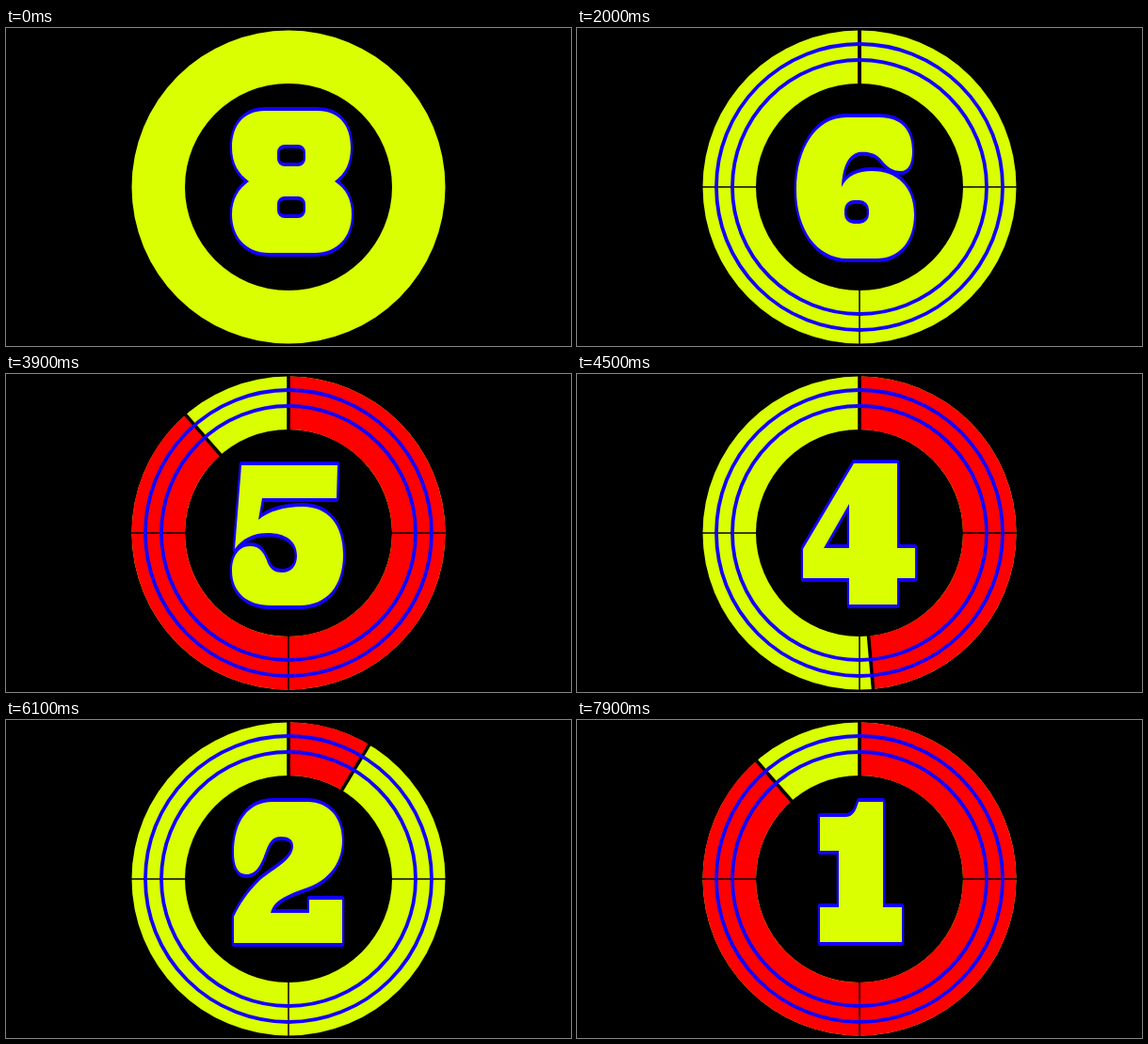
Recreate the animation shown at these times as an HTML page with a canvas. Size 600 by 338 pixels, loop 8 s.

```html
<!DOCTYPE html>
<html lang="en">
<head>
<meta charset="utf-8">
<title>Countdown</title>
<style>
  html, body { margin: 0; width: 100%; height: 100%; overflow: hidden; background: #000; }
  canvas { display: block; width: 100vw; height: 100vh; }
</style>
</head>
<body>
<canvas id="stage" width="600" height="338"></canvas>
<script>
const ctx = document.getElementById('stage').getContext('2d');
const YELLOW = '#d9ff00', RED = '#ff0000', BLUE = '#1200ff', BLACK = '#000';
const CX = 300, CY = 169, OUTER = 166.5, INNER = 110;
const TAU = Math.PI * 2, TOP = -Math.PI / 2;
const LOOP = 8000, STEP = 100;
const TALL = 1.75; // outline is thicker vertically than horizontally

const box = (x, y, w, h, r) =>
  `M${x + r} ${y}h${w - 2 * r}a${r} ${r} 0 0 1 ${r} ${r}v${h - 2 * r}a${r} ${r} 0 0 1 ${-r} ${r}` +
  `h${2 * r - w}a${r} ${r} 0 0 1 ${-r} ${-r}v${2 * r - h}a${r} ${r} 0 0 1 ${r} ${-r}Z`;

const shapes = {
  8: 'M275 88H331C353 88 366 103 366 127C366 144 360 155 349 163C361 171 367 182 367 198' +
     'C367 222 352 239 328 239H279C255 239 240 222 240 198C240 182 247 171 258 163' +
     'C247 155 240 144 240 127C240 103 253 88 275 88Z' +
     box(288, 124, 30, 23, 8) + box(288, 179, 30, 23, 8),
  7: 'M247 99H355L324 249H271L308 137H281V164H247Z',
  6: 'M286 95H321C345 95 356 109 356 131C356 144 352 152 344 152C334 152 329 147 324 141' +
     'C318 133 309 131 299 132C288 135 282 147 281 169C287 157 298 152 313 152' +
     'C340 152 358 169 358 198C358 227 342 245 318 245H287C254 245 233 213 233 172' +
     'C233 128 254 95 286 95Z' + box(284, 183, 26, 25, 10),
  5: 'M250 97H352L351 132H272L268 155C279 146 295 141 315 141C342 141 358 160 358 192' +
     'C358 225 341 246 312 246H281C256 246 240 232 240 209C240 194 247 183 259 183' +
     'C270 183 274 190 278 201C281 208 286 211 293 211C303 211 309 204 309 193' +
     'C309 177 296 169 278 169C262 169 251 175 243 186Z',
  4: 'M294 95H340V185H359V217H340V245H289V217H240V186ZM289 138L262 185H289Z',
  3: 'M272 95H325C345 95 356 108 356 130C356 148 351 161 342 169C351 177 356 190 356 205' +
     'C356 230 345 245 325 245H277C255 245 241 229 241 205C241 188 247 178 257 178' +
     'C267 178 271 184 276 192C281 201 285 205 293 206H298C304 206 308 202 308 197' +
     'C308 190 304 187 298 187H286V151H298C304 151 308 148 308 142C308 136 304 132 298 132' +
     'H293C285 133 281 138 276 147C271 156 266 162 256 162C246 162 241 153 241 137' +
     'C241 111 253 95 272 95Z',
  2: 'M283 87H320C343 87 357 104 357 128C357 150 345 168 323 177C305 184 285 189 281 205' +
     'H322V191H357V237H242V209C248 196 256 184 268 172C280 160 305 150 305 134' +
     'C305 127 300 124 292 124C282 124 279 131 275 142C270 156 265 164 255 164' +
     'C246 164 242 155 242 141C242 108 257 87 283 87Z',
  1: 'M299 87H325V199H345V236H258V199H278V139H258V103H285C293 103 296 97 299 87Z'
};

const digits = {};
for (const n in shapes) {
  const fill = new Path2D(shapes[n]);
  const edge = new Path2D();
  edge.addPath(fill, new DOMMatrix([1, 0, 0, 1 / TALL, 0, 0]));
  digits[n] = { fill, edge };
}

function drawDigit(n) {
  const { fill, edge } = digits[n];
  ctx.save();
  ctx.scale(1, TALL);
  ctx.strokeStyle = BLUE;
  ctx.lineWidth = 4.6;
  ctx.lineJoin = 'round';
  ctx.stroke(edge);
  ctx.restore();
  ctx.fillStyle = YELLOW;
  ctx.fill(fill, 'evenodd');
}

function band(color, sweep) {
  ctx.fillStyle = color;
  ctx.beginPath();
  ctx.arc(CX, CY, OUTER, TOP, TOP + sweep);
  ctx.arc(CX, CY, INNER, TOP + sweep, TOP, true);
  ctx.fill();
}

function spoke(angle, width) {
  const c = Math.cos(TOP + angle), s = Math.sin(TOP + angle);
  ctx.strokeStyle = BLACK;
  ctx.lineWidth = width;
  ctx.beginPath();
  ctx.moveTo(CX + c * (INNER - 2), CY + s * (INNER - 2));
  ctx.lineTo(CX + c * (OUTER + 2), CY + s * (OUTER + 2));
  ctx.stroke();
}

function circle(r) {
  ctx.strokeStyle = BLUE;
  ctx.lineWidth = 3.8;
  ctx.beginPath();
  ctx.arc(CX, CY, r, 0, TAU);
  ctx.stroke();
}

function draw(time) {
  const step = Math.floor((time % LOOP) / STEP);
  const sweep = Math.max(0, (step % 10) * 36 - 5) * TAU / 360;
  ctx.fillStyle = BLACK;
  ctx.fillRect(0, 0, 600, 338);
  band(YELLOW, TAU);
  if (step > 0) { // the opening moment is a plain ring
    if (sweep) band(RED, sweep);
    for (let i = 1; i < 4; i++) spoke(i * TAU / 4, 1.5);
    spoke(0, 3.6);
    spoke(sweep, 3.6);
    circle(152);
    circle(135);
  }
  drawDigit(8 - Math.floor(step / 10));
}

function tick() {
  draw(performance.now());
  requestAnimationFrame(tick);
}
tick();
</script>
</body>
</html>
```
